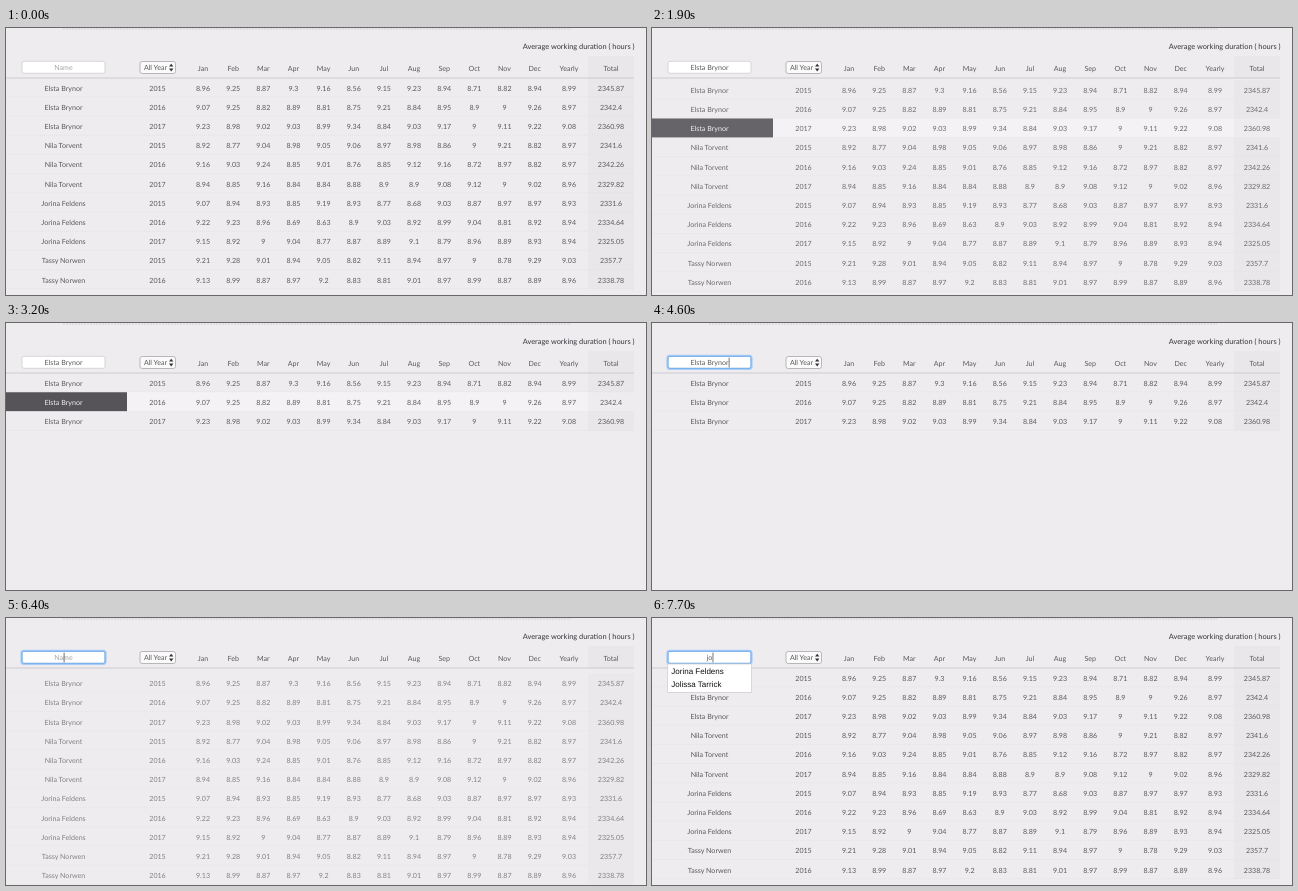
An HTML page that plays this animation: 640x267 px, repeating every 8 s.

```html
<!DOCTYPE html>
<html lang="en">
<head>
<meta charset="utf-8">
<title>Average working duration</title>
<style>
  html, body { margin: 0; width: 100%; height: 100%; overflow: hidden; background: #eeecef; }
  svg { display: block; }
  text {
    font: 7.1px Lato, "Open Sans", sans-serif;
    fill: #5a585c;
    text-anchor: middle;
    text-rendering: geometricPrecision;
    white-space: pre;
  }
  .title { font-size: 7.4px; fill: #454347; font-weight: 500; text-anchor: end; }
  .hint { fill: #a5a3a7; }
  .light { fill: #f2f0f3; }
  .option { font: 8px "Liberation Sans", Arial, sans-serif; fill: #111; text-anchor: start; }
</style>
</head>
<body>
<svg id="stage" width="640" height="267" viewBox="0 0 640 267"></svg>
<script>
const LOOP = 8000;
const ROWS = 11, ROW_H = 19.2, TOP = 49.8;
const NAME_X = 57.5, YEAR_X = 151.5, YEARLY_X = 563, TOTAL_X = 605;
const monthX = m => 197 + 30.15 * m;
const MONTHS = 'Jan Feb Mar Apr May Jun Jul Aug Sep Oct Nov Dec'.split(' ');
const NAMES = ['Elsta Brynor', 'Nila Torvent', 'Jorina Feldens', 'Tassy Norwen'];

// Text of the rows that stay in the filtered list: months, then total
const KEPT = [
  '8.96 9.25 8.87 9.3 9.16 8.56 9.15 9.23 8.94 8.71 8.82 8.94 2345.87',
  '9.07 9.25 8.82 8.89 8.81 8.75 9.21 8.84 8.95 8.9 9 9.26 2342.4',
  '9.23 8.98 9.02 9.03 8.99 9.34 8.84 9.03 9.17 9 9.11 9.22 2360.98'
];

const stage = document.getElementById('stage');
const round2 = v => +v.toFixed(2);

let seed = 7;
const random = () => (seed = seed * 16807 % 2147483647) / 2147483647;

const workdays = i => i % 3 === 2 ? 260 : 261;

function rowValues(i) {
  if (KEPT[i]) return KEPT[i].split(' ');
  const hours = MONTHS.map(() => round2(8.6 + .35 * (random() + random())));
  const mean = hours.reduce((a, b) => a + b) / hours.length;
  return [...hours, round2(mean * workdays(i))];
}

// Drawing

function add(parent, tag, attrs = {}) {
  const el = document.createElementNS('http://www.w3.org/2000/svg', tag);
  for (const key in attrs) el.setAttribute(key, attrs[key]);
  return parent.appendChild(el);
}
const group = parent => add(parent, 'g');
const rect = (parent, x, y, width, height, fill, more) =>
  add(parent, 'rect', { x, y, width, height, fill, ...more });
const line = (parent, x1, x2, y, stroke, more) =>
  add(parent, 'line', { x1, x2, y1: y, y2: y, stroke, ...more });
function label(parent, x, y, str, cls = '') {
  const el = add(parent, 'text', { x, y, class: cls });
  el.textContent = str;
  return el;
}

// Motion

const tracks = [];
const clamp = v => Math.min(1, Math.max(0, v));

// cubic-bezier(.25, .1, .25, 1)
function ease(x) {
  const curve = (a, b, s) => 3 * a * s * (1 - s) ** 2 + 3 * b * s * s * (1 - s) + s ** 3;
  let lo = 0, hi = 1;
  for (let n = 0; n < 20; n++) {
    const mid = (lo + hi) / 2;
    if (curve(.25, .25, mid) < x) lo = mid; else hi = mid;
  }
  return curve(.1, 1, lo);
}

const ramp = (t, from, to) => clamp((t - from) / (to - from));
const setOpacity = (el, v) => el.setAttribute('opacity', v);

// Rise over [a, b], fall over [c, d]
const pulse = (el, a, b, c, d) =>
  tracks.push(t => setOpacity(el, ramp(t, a, b) - ramp(t, c, d)));

const show = (el, ...spans) =>
  tracks.push(t => setOpacity(el, spans.some(([from, to]) => t >= from && t < to) ? 1 : 0));

// Scene

function buildRow(parent, i) {
  const y = TOP + i * ROW_H, base = y + 12.8;
  const name = NAMES[Math.floor(i / 3)];
  const values = rowValues(i);
  const total = values.pop();

  rect(parent, 582, y, 46, ROW_H, '#e9e7ea');
  line(parent, 0, 628, y + ROW_H - .2, '#dddbde', { 'stroke-width': .6, 'stroke-dasharray': '1 1' });
  label(parent, NAME_X, base, name);

  const hover = group(parent);
  setOpacity(hover, 0);
  rect(hover, 0, y, 121, ROW_H - .3, '#555357');
  rect(hover, 121, y, 461, ROW_H - .3, '#f5f3f6');
  rect(hover, 582, y, 46, ROW_H - .3, '#eeecef');
  label(hover, NAME_X, base, name, 'light');

  label(parent, YEAR_X, base, 2015 + i % 3);
  values.forEach((v, m) => label(parent, monthX(m), base, v));
  label(parent, YEARLY_X, base, round2(total / workdays(i)));
  label(parent, TOTAL_X, base, total);
  return hover;
}

function buildTable() {
  const body = group(stage);
  const kept = group(body), rest = group(body);
  const hovers = [];
  for (let i = 0; i < ROWS; i++) hovers.push(buildRow(i < KEPT.length ? kept : rest, i));

  pulse(hovers[3], 1050, 1250, 1250, 1500);
  pulse(hovers[2], 1250, 1550, 2345, 2346);
  pulse(hovers[1], 2400, 2700, 3650, 3930);
  pulse(hovers[0], 3640, 3900, 3780, 3980);
  show(rest, [0, 2345], [5970, LOOP]);

  const leave = (t, from) => ease(ramp(t, from, from + 500));
  const enter = (t, from) => ease(ramp(t, from, from + 1000));
  tracks.push(t => {
    const gone = leave(t, 1845) - enter(t, 2345) + leave(t, 5230) - enter(t, 5970);
    setOpacity(body, 1 - gone);
    body.setAttribute('transform', `translate(0 ${20 * gone})`);
  });
}

function buildHeader() {
  line(stage, 57, 565, 1, '#c9c7ca', { 'stroke-width': .8, 'stroke-dasharray': '2 1' });
  label(stage, 628.5, 20.5, 'Average working duration ( hours )', 'title');
  rect(stage, 582, 28, 46, 22, '#e9e7ea');
  line(stage, 0, 628, 50, '#c9c7ca', { 'stroke-width': .9 });
  MONTHS.forEach((name, m) => label(stage, monthX(m), 43, name));
  label(stage, YEARLY_X, 43, 'Yearly');
  label(stage, TOTAL_X, 43, 'Total');

  rect(stage, 134, 33.5, 35.5, 12, '#fbfafb', { rx: 2.2, stroke: '#a9a7aa', 'stroke-width': .8 });
  label(stage, 149.5, 42.2, 'All Year');
  add(stage, 'path', { d: 'M163 38.6L165.2 35.8L167.4 38.6ZM163 40.6L165.2 43.4L167.4 40.6Z', fill: '#333' });
}

function buildInput() {
  const box = { rx: 2, 'stroke-width': .8 };
  rect(stage, 16, 33.3, 83, 12, '#fff', { ...box, stroke: '#cfcdd0' });
  const ring = group(stage);
  rect(ring, 15.4, 32.7, 84.2, 13.2, 'none', { rx: 2.4, stroke: '#a5cdf8', 'stroke-width': 2 });
  rect(ring, 16, 33.3, 83, 12, 'none', { ...box, stroke: '#66a6ea' });
  show(ring, [4550, LOOP]);

  const mark = rect(stage, 0, 34.2, 0, 10.4, '#b4d5fe');
  show(mark, [4650, 5180]);

  const entry = (str, cls, ...spans) => {
    const el = label(stage, NAME_X, 42, str, cls);
    show(el, ...spans);
    return el.getComputedTextLength();
  };
  const caret = (width, ...spans) =>
    show(rect(stage, NAME_X + width / 2 + .2, 34.6, .8, 9.8, '#555'), ...spans);

  entry('Name', 'hint', [0, 1780], [5180, 6960]);
  caret(0, [5180, 5710], [6240, 6770]);
  const width = entry(NAMES[0], '', [1780, 5180]);
  caret(width, [4550, 4650]);
  caret(entry('j', '', [6960, 7270]), [6960, 7270]);
  caret(entry('jo', '', [7270, LOOP]), [7270, LOOP]);

  // The selection is dragged from the end of the name to its start
  tracks.push(t => {
    const w = width * ramp(t, 4650, 5000);
    mark.setAttribute('x', NAME_X + width / 2 - w);
    mark.setAttribute('width', w);
  });
}

function buildOptions() {
  const list = group(stage);
  rect(list, 15.7, 46, 83.8, 28.4, '#fff', { stroke: '#cccacd', 'stroke-width': .7 });
  [NAMES[2], 'Jolissa Tarrick'].forEach((s, i) => label(list, 19.3, 56 + i * 13.3, s, 'option'));
  pulse(list, 7550, 7660, LOOP, LOOP + 1);
}

buildTable();
buildHeader();
buildInput();
buildOptions();

const start = performance.now();
function frame() {
  const t = (performance.now() - start) % LOOP;
  for (const update of tracks) update(t);
  requestAnimationFrame(frame);
}
frame();
</script>
</body>
</html>
```
